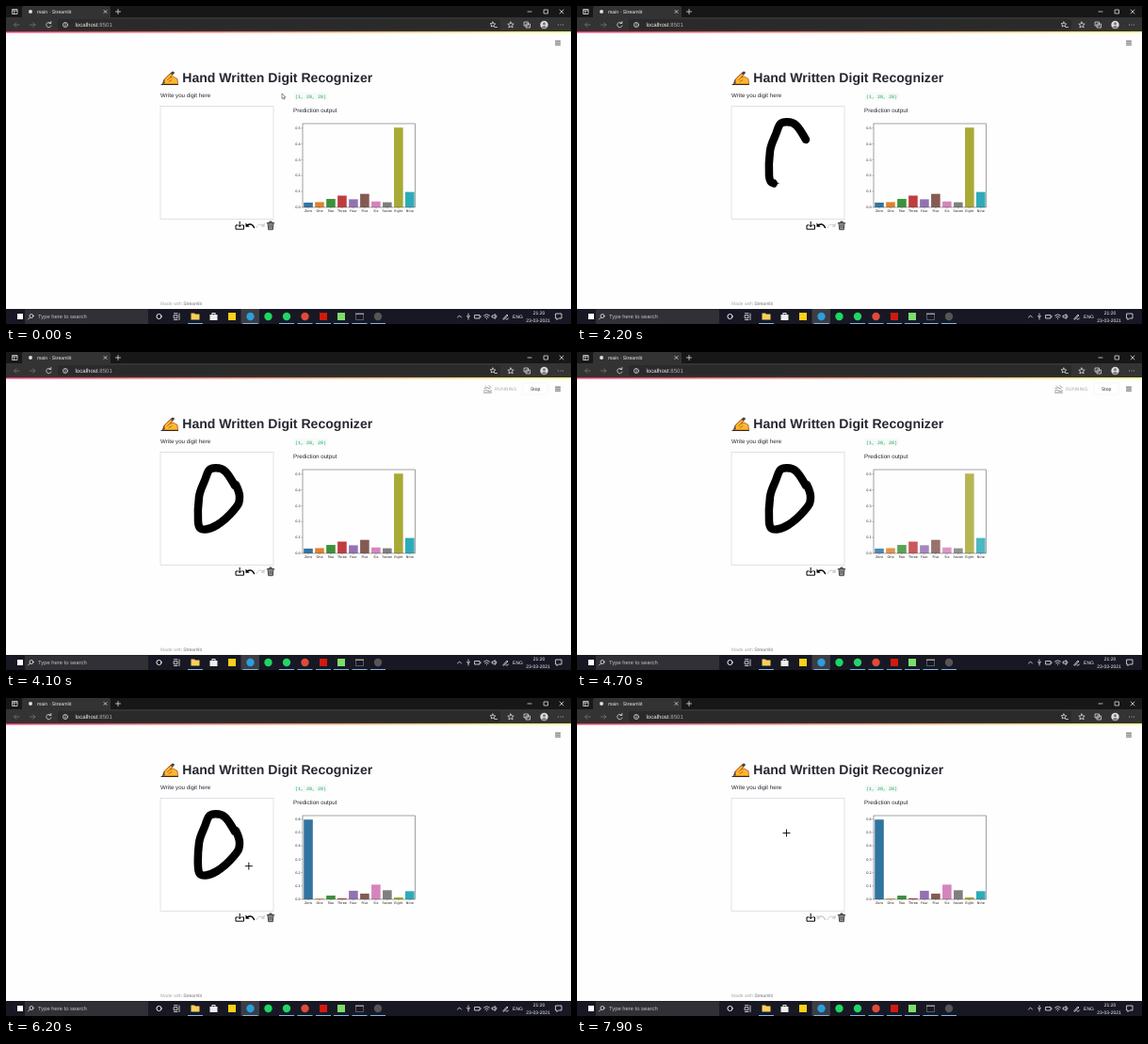
These frames come from a looping animation (600x338 px, 8000 ms). An HTML page:

```html
<!DOCTYPE html>
<html lang="en">
<head>
<meta charset="utf-8">
<title>Digit recognizer</title>
<style>
html, body { margin: 0; width: 100%; height: 100%; overflow: hidden; background: #fff; }
svg { display: block; width: 600px; height: 338px; font-family: "Liberation Sans", Arial, sans-serif; text-rendering: geometricPrecision; }
.line { fill: none; stroke-linecap: round; stroke-linejoin: round; }
#chart { font: 3.5px "DejaVu Sans", sans-serif; fill: #222; }
</style>
</head>
<body>
<svg viewBox="0 0 600 338" xmlns="http://www.w3.org/2000/svg">
  <defs>
    <linearGradient id="accent"><stop stop-color="#f63366"/><stop offset="1" stop-color="#fffd80"/></linearGradient>
  </defs>
  <rect width="600" height="338" fill="#fefefe"/>

  <!-- browser -->
  <rect width="600" height="13" fill="#171717"/>
  <path d="M17 13V2q0-2 2-2H109q2 0 2 2V13z" fill="#333"/>
  <rect y="12" width="600" height="15" fill="#333"/>
  <rect x="55" y="14" width="470" height="11.500" rx="2" fill="#2a2a2a"/>
  <rect y="27" width="600" height="1.500" fill="url(#accent)"/>
  <circle cx="26" cy="6" r="2" fill="#ddd"/>
  <g fill="#eee">
    <text x="33" y="8" font-size="5.200">main · Streamlit</text>
    <text x="73.500" y="22" font-size="6.100">localhost<tspan fill="#aaa">:8501</tspan></text>
  </g>
  <g class="line" stroke="#ddd" stroke-width=".8">
    <path d="M7 3.500H12V8.500H7zM7 5H12M8.800 5V8.500"/>
    <path d="M104 4.500l3 3m0-3l-3 3M116.500 6h5M119 3.500v5"/>
    <path d="M554 6h4M571.500 4h4v4h-4zM588 4l4 4m0-4l-4 4"/>
    <path d="M47.500 18.200A2.700 2.700 0 1 0 48 21M47.800 16.500v2h-2"/>
    <circle cx="63" cy="20" r="2.500"/><path d="M63 19.800v1.400M63 18.600v.1"/>
    <path d="M517 17l.8 1.800 2 .2-1.500 1.400.3 1.500-1.600-.9-1.800 1 .4-2-1.500-1.300 2-.2zM519 22.500h2.500"/>
    <path d="M536 17l1 2 2.200.2-1.700 1.500.6 2.200-2.100-1.200-2.100 1.200.6-2.200-1.700-1.500 2.200-.2z"/>
    <path d="M550.500 17h4v4h-4zM552.500 19h4v4h-4z"/>
    <path d="M586.500 20h.1M589 20h.1M591.500 20h.1"/>
  </g>
  <path class="line" stroke="#777" stroke-width=".8" d="M14 20H8.500l2.300-2.300M8.500 20l2.300 2.300M25.500 20H31l-2.300-2.300M31 20l-2.300 2.300"/>
  <circle cx="571.500" cy="20" r="4.200" fill="#ddd"/>
  <circle cx="571.500" cy="18.700" r="1.500" fill="#777"/>
  <path d="M568.500 22.800q3-3.600 6 0q-3 2-6 0" fill="#777"/>

  <!-- page -->
  <path class="line" stroke="#444" stroke-width=".9" d="M583.500 37.200h5M583.500 39.200h5M583.500 41.200h5"/>
  <g id="running" font-size="5">
    <path id="runner" class="line" stroke="#888" stroke-width=".9"/>
    <text x="519" y="41.200" fill="#aaa">RUNNING</text>
    <rect x="549" y="33" width="26" height="12" rx="1.300" fill="#fff" stroke="#eee" stroke-width=".5"/>
    <text x="557" y="40.700" fill="#333">Stop</text>
  </g>
  <g class="line">
    <path d="M166.500 82.500l1.500-4 8.500-8.500q1.500-.5 2 1l-7.500 9z" fill="#444" stroke="#222" stroke-width=".8"/>
    <path d="M168 80.500q-.5-2.500 2-4.500l4.500-4q2.500-.5 2 1.500l-2 2.500 3-1 4.500 2.500.5 5.500h-13.500z" fill="#fdb92c" stroke="#a3401c" stroke-width=".7"/>
    <path d="M171.500 78.500l3-2.500M173 80.500l3-2" stroke="#a3401c" stroke-width=".7"/>
    <path d="M165 83.500h17.500" stroke="#3b2a1c"/>
  </g>
  <text x="187.300" y="81.200" font-size="14.050" font-weight="bold" fill="#262730">Hand Written Digit Recognizer</text>
  <g font-size="6.200" fill="#262730">
    <text x="164" y="97.200">Write you digit here</text>
    <text x="305" y="113.400">Prediction output</text>
  </g>
  <rect x="305.500" y="92" width="36.500" height="8" rx="1" fill="#f8f9fb"/>
  <text x="307" y="97.600" font-size="5" fill="#09ab3b" style="font-family:'Liberation Mono',monospace">(1, 28, 28)</text>
  <text x="164" y="317.500" font-size="5" fill="#aaa">Made with <tspan fill="#777">Streamlit</tspan></text>

  <rect x="164" y="106.500" width="120" height="120" fill="#fff" stroke="#d3d6dc" stroke-width=".7"/>
  <path id="stroke" class="line" stroke="#000" stroke-width="8.500" d="M243 142C240 137 237 131 233 127S225 123 220 123.500 214 128 212 134 206 146 205 154 203.500 172 204 180 207 189 212 188.500 219 187 224 184 236 175 242 168 248 159 248 154 246 145 244 141"/>
  <g class="line" stroke="#000">
    <path d="M245.500 233h-1.500v4.200h8.500V233h-1.500M248.200 229.300v5M246.500 232.800l1.700 1.700 1.700-1.700"/>
    <g id="undo"><path d="M256 233q5-3 7.500 2.500" stroke-width="1.500"/><path d="M254.500 230.500v4.200h4.200z" fill="currentColor" stroke="none"/></g>
    <g stroke="#ccc" color="#ccc"><path d="M273 233q-5-3-7 2.500"/><path d="M274.700 230.500v4.200h-4.200z" fill="currentColor" stroke="none"/></g>
    <path id="trash" d="M277.200 230.700h7.600M279.500 230.500l.5-1.500h2l.5 1.500M278 231l.7 6.700h4.600l.7-6.700zM280 232.500v3.500M282 232.500v3.500"/>
  </g>
  <g id="chart"></g>

  <!-- taskbar -->
  <rect y="322" width="600" height="16" fill="#181824"/>
  <rect x="20" y="322.500" width="131" height="15.500" fill="#303036"/>
  <rect x="12" y="327" width="6" height="6" fill="#fff"/>
  <text x="34" y="332.200" font-size="5.850" fill="#c4c4c4">Type here to search</text>
  <rect x="249.500" y="322" width="19.500" height="16" fill="#3c3d45"/>
  <g class="line" stroke="#eee" stroke-width=".8">
    <circle cx="27" cy="329.500" r="2"/><path d="M25.500 331l-2 2"/>
    <circle cx="162.500" cy="330" r="2.600" stroke-width="1"/>
    <path d="M178.500 328.700h3.500v3h-3.500zM178.500 326.700h3.500M178.500 333.500h3.500M184 327v6.500"/>
    <path d="M479.500 331l2-2 2 2"/>
    <path d="M491 327v3M489.500 329.500q1.500 3 3 0M491 331.500v1.500"/>
    <path d="M498 328.500h5v3.500h-5zM504 329.700v1"/>
    <path d="M507.500 329q3-2.600 6 0M508.800 330.800q1.700-1.300 3.400 0M510.500 332.500h.1"/>
    <path d="M516.500 329h1.200l1.500-1.500v5l-1.500-1.500h-1.200zM520.500 328.700q1.200 1.300 0 2.600"/>
    <path d="M528 332.500l4-4.500 1 1-4.200 4zM531 333q2 .7 2.500-1"/>
    <path d="M584 327h6v5h-3.500l-1.500 1.500V332h-1z"/>
  </g>
  <g id="apps"></g>
  <g font-size="5" fill="#f2f2f2" text-anchor="middle">
    <text x="543.500" y="332">ENG</text><text x="566" y="328.200">21:20</text><text x="565" y="335.600">23-03-2021</text>
  </g>

  <g id="cursor">
    <path id="arrow" d="M0 0V5.500L1.300 4.400 2.200 6.200 3 5.800 2.200 4.100H4z" fill="#fff" stroke="#222" stroke-width=".5"/>
    <path id="cross" d="M-4 0H4M0-4V4" stroke="#000" stroke-width=".9"/>
    <path id="hand" d="M-.6 0q.7-.7 1.300 0v2l2.300.7q.7.300.6 1l-.5 2.300H.2L-1.800 3.800q-.2-1 1.200-.3z" fill="#fff" stroke="#222" stroke-width=".5"/>
  </g>
</svg>
<script>
const LOOP = 8000;
const $ = id => document.getElementById(id);
const show = (id, on) => $(id).style.display = on ? "" : "none";

const names = "Zero One Two Three Four Five Six Seven Eight Nine".split(" ");
const colors = "3274a1 e1812c 3a923a c03d3e 9372b2 845b53 d684bd 7f7f7f a9aa35 2eabb8".split(" ");
const charts = [
  [.03, .033, .053, .074, .051, .085, .037, .032, .503, .097],
  [.596, .005, .028, .008, .064, .043, .11, .068, .015, .061]
];

function chartMarkup(values) {
  const scale = 89 / (Math.max(...values) * 1.05);
  let out = "";
  values.forEach((v, i) => {
    const x = 321 + i * 11.98, h = v * scale;
    out += `<rect class="bar" x="${x - 4.8}" y="${214 - h}" width="9.6" height="${h}" fill="#${colors[i]}"/>
      <path d="M${x} 214v1.200" stroke="#333" stroke-width=".4"/>
      <text x="${x}" y="219.200" text-anchor="middle">${names[i]}</text>`;
  });
  for (let n = 0; n * .1 * scale < 89; n++) {
    const y = 214 - n * .1 * scale;
    out += `<path d="M315 ${y}h-1.200" stroke="#333" stroke-width=".4"/>
      <text x="312.800" y="${y + 1.2}" text-anchor="end">${(n / 10).toFixed(1)}</text>`;
  }
  return out + '<rect x="315" y="125" width="119.500" height="89" fill="none" stroke="#444" stroke-width=".5"/>';
}

// x, colour, shape, open
const apps = [
  [201, "#f8cf5b", "folder", 1], [220.5, "#eee", "bag", 0], [240, "#fcd116", "square", 0],
  [259.5, "#2b9fd8", "circle", 1], [278.5, "#1ed760", "circle", 0], [298, "#25d366", "circle", 1],
  [317.5, "#e04a3a", "circle", 1], [337, "#d3190f", "square", 1], [356, "#7edc6a", "square", 1],
  [375.5, "#999", "console", 1], [395, "#555", "circle", 1]
];
const shapes = {
  circle: "M-4.200 0a4.200 4.200 0 1 0 8.400 0a4.200 4.200 0 1 0-8.400 0",
  square: "M-4-4H4V4H-4z",
  folder: "M-4.500-3.500h3.500l1 1h4.500v6h-9z",
  bag: "M-4-2h2v-2h4v2h2v6h-8zM-1-2h2v-1h-2z",
  console: "M-4.500-3.500h9v7h-9zM-4-2v5h8v-5z"
};
$("apps").innerHTML = apps.map(([x, fill, shape, open]) =>
  `<path transform="translate(${x} 330)" d="${shapes[shape]}" fill="${fill}" fill-rule="evenodd"/>` +
  (open ? `<rect x="${x - 8}" y="337" width="16" height="1" fill="#76b9ed"/>` : "")).join("");

// Linear interpolation through rows of [time, ...values]
function track(rows, t) {
  let i = 1;
  while (i < rows.length - 1 && t > rows[i][0]) i++;
  const a = rows[i - 1], b = rows[i];
  const k = Math.min(1, Math.max(0, (t - a[0]) / (b[0] - a[0])));
  return a.slice(1).map((v, j) => v + (b[j + 1] - v) * k);
}

const pen = $("stroke"), length = pen.getTotalLength();
const penTrack = [[1100, 0], [1200, 3], [1400, 18], [2000, 84], [2900, length]];
const mouse = [[0, 293, 93], [600, 244, 139], [700, 244, 139], [900, 244, 143], [1100, 243, 142]];
const mouseLater = [[2900, 246, 146], [3000, 247, 150], [5900, 247, 150], [6800, 279.5, 236], [7200, 279.5, 236], [7900, 222.5, 143.5]];
const fade = [[4400, 1], [4900, .75], [5000, .85], [5200, 1]];
const poses = [
  "M509 36.200h.1M508 38.700l3-1 3 1.500M507.500 41.200q2-1.500 4 0t4 0M507.500 43.200h8M513 35.700l2 2",
  "M512 35.500h.1M511 37.700l1 2.500-3 3M512 40.200l2.500 1.500v1.500M508.500 38.700l2.500-1 3.500 1.500"
];
let shown = -1;

function draw(t) {
  const [drawn] = track(penTrack, t);
  show("stroke", t > 1100 && t < 7300);
  pen.style.strokeDasharray = `${drawn} 999`;

  let [x, y] = track(t < 2900 ? mouse : mouseLater, t);
  if (t > 1100 && t < 2900) ({ x, y } = pen.getPointAtLength(drawn + 2));
  const onCanvas = x > 164 && x < 284 && y > 106 && y < 227;
  const onTrash = x > 276 && x < 286 && y > 228;
  $("cursor").setAttribute("transform", `translate(${x} ${y})`);
  show("cross", onCanvas);
  show("hand", onTrash);
  show("arrow", !onCanvas && !onTrash);
  $("trash").setAttribute("stroke", onTrash ? "#f0483e" : "#444");
  $("trash").setAttribute("fill", onTrash ? "#fbc4bf" : "#aaa");
  const undo = t < 7300 ? "#000" : "#ccc";
  $("undo").setAttribute("stroke", undo);
  $("undo").setAttribute("color", undo);

  show("running", t >= 3900 && t < 5200);
  $("runner").setAttribute("d", poses[(Math.floor(t / 100) + 1) % 2]);
  const index = t < 5000 ? 0 : 1;
  if (index !== shown) $("chart").innerHTML = chartMarkup(charts[shown = index]);
  const [opacity] = track(fade, t);
  document.querySelectorAll(".bar").forEach(bar => bar.style.opacity = opacity);
}

const start = performance.now();
function tick() {
  draw(Math.floor((performance.now() - start) % LOOP / 100) * 100);
  requestAnimationFrame(tick);
}
tick();
</script>
</body>
</html>
```
